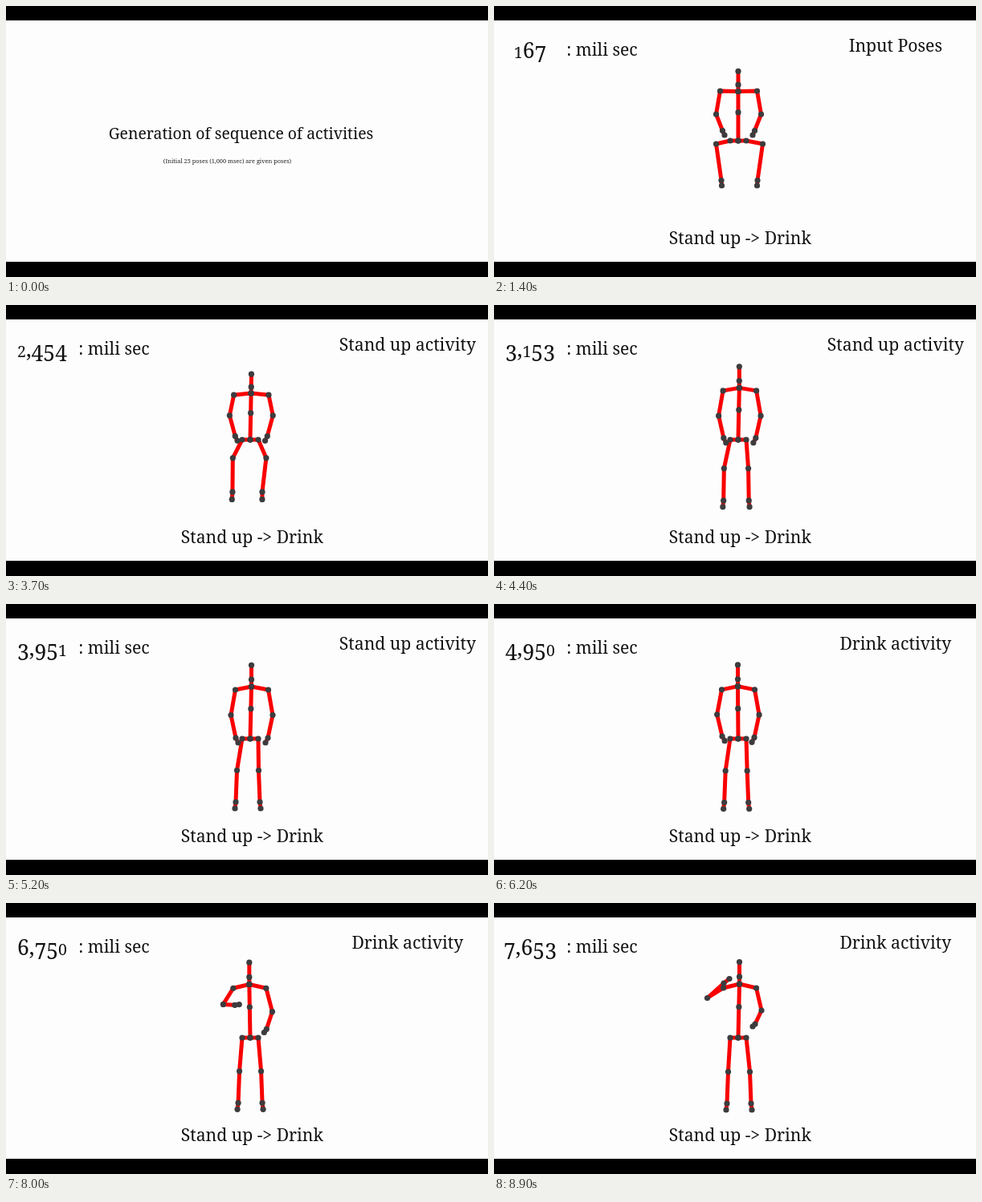
Animation of 600 by 338 pixels, one loop 9 s. Source, as an HTML page:

```html
<!DOCTYPE html>
<html lang="en">
<head>
<meta charset="utf-8">
<title>Generation of sequence of activities</title>
<style>
  html, body { margin: 0; width: 100%; height: 100%; overflow: hidden; background: #000; }
  svg { display: block; width: 100%; height: 100%; }
  text { font: 21.2px Georgia, "Noto Serif", serif; fill: #111; text-anchor: middle; }
  #title { font-size: 19.4px; }
  #note { font-size: 7.4px; fill: #222; }
  #counter { font-size: 26.5px; }
  .small { font-size: 19.5px; }
  #bones { fill: none; stroke: #f80000; stroke-width: 5; stroke-linejoin: round; }
  #joints { fill: #3c3c3e; }
</style>
</head>
<body>
<svg viewBox="0 0 600 338" xmlns="http://www.w3.org/2000/svg">
  <rect width="600" height="338" fill="#000"/>
  <rect y="18" width="600" height="301" fill="#fdfdfe"/>
  <g id="intro">
    <text id="title" x="292.5" y="166">Generation of sequence of activities</text>
    <text id="note" x="275.5" y="196">(Initial 25 poses (1,000 msec) are given poses)</text>
  </g>
  <g id="scene">
    <text id="counter" x="45" y="64.5"></text>
    <text x="134.5" y="62">: mili sec</text>
    <text id="activity" x="499.8" y="56.5"></text>
    <text x="306.3" y="296.5">Stand up -&gt; Drink</text>
    <path id="bones"/>
    <g id="joints"></g>
  </g>
</svg>
<script>
const SVG = "http://www.w3.org/2000/svg";
const LOOP = 9000, STEP = 100, SCENE_START = 1200;
const PELVIS = [304, 168], HIP_SPREAD = 10;
const ARM = ["shoulder", "elbow", "wrist", "hand"], LEG = ["knee", "ankle", "foot"];

// Each joint as [distance from the midline, y]; dip and sway apply while leaning forward.
const BODY = {
  shoulder: { seated: [23, 106], standing: [20.5, 107], dip: 17 },
  elbow: { seated: [28, 135], standing: [26, 138.5], dip: 3 },
  wrist: { seated: [20, 155.5], standing: [20, 167], dip: 6 },
  hand: { seated: [17.5, 161], standing: [17, 173], dip: 6 },
  knee: { seated: [29, 172], standing: [13.5, 207.5] },
  ankle: { seated: [22.5, 217.5], standing: [15, 247], sway: -8 },
  foot: { seated: [22, 224], standing: [16, 255], dip: 6, sway: -9 }
};
// Where the arms end up when drinking.
const DRINKING_LEFT = { elbow: [265.5, 118.5], wrist: [286, 100], hand: [293, 94.5] };
const DRINKING_RIGHT = { elbow: [333, 134], wrist: [325, 151], hand: [322, 154] };

const COUNT_KEYS = [[1400, 167], [2700, 1498], [3700, 2454], [5200, 3951], [7200, 5948], [8900, 7653]];
const ACTIVITIES = [[1200, "Input Poses"], [2200, "Stand up activity"], [5300, "Drink activity"]];

const $ = id => document.getElementById(id);
const mix = (a, b, k) => a + (b - a) * k;
const mixPoint = (p, q, k) => p.map((v, i) => mix(v, q[i], k));
const ramp = (t, from, to) => Math.min(1, Math.max(0, (t - from) / (to - from)));
const smooth = k => k * k * (3 - 2 * k);

function figure(t) {
  const rise = smooth(ramp(t, 2400, 4900));
  const lean = ramp(t, 1800, 2700) - ramp(t, 2700, 4200);
  const settle = ramp(t, 5700, 8700);
  const drink = settle ** 2;
  const shift = -4 * Math.sin(Math.PI * settle);

  const joint = (name, side, midline, drop) => {
    const { seated, standing, dip = 0, sway = 0 } = BODY[name];
    const [spread, y] = mixPoint(seated, standing, rise);
    return [midline + side * spread + sway * lean, y + dip * lean + drop];
  };
  const arm = (side, goal) => ARM.map(name => {
    const p = joint(name, side, mix(304.5, 306, rise) + shift, -settle);
    return goal[name] ? mixPoint(p, goal[name], drink) : p;
  });
  const leg = side => [
    [PELVIS[0] + side * HIP_SPREAD, PELVIS[1]],
    ...LEG.map(name => joint(name, side, mix(305.5, 301, rise) + 4 * settle, 3 * settle))
  ];

  const chest = [mix(304, 305.5, rise) + lean + shift, mix(106.5, 103, rise) + 16 * lean - 2 * settle];
  const head = [chest[0] + lean, chest[1] - .41 * (PELVIS[1] - chest[1])];
  const neck = mixPoint(chest, head, .33);
  const spine = mixPoint(PELVIS, chest, .575);
  return [
    [head, neck, chest, spine, PELVIS],
    [chest, ...arm(-1, DRINKING_LEFT)],
    [chest, ...arm(1, DRINKING_RIGHT)],
    [PELVIS, ...leg(-1)],
    [PELVIS, ...leg(1)]
  ];
}

function drawFigure(t) {
  const chains = figure(t), dots = $("joints");
  $("bones").setAttribute("d", chains.map(c => "M" + c.join("L")).join(""));
  chains.flat().forEach(([x, y], i) => {
    const dot = dots.children[i] || dots.appendChild(document.createElementNS(SVG, "circle"));
    dot.setAttribute("r", 3.6);
    dot.setAttribute("cx", x);
    dot.setAttribute("cy", y);
  });
}

function countAt(t) {
  let i = 1;
  while (i < COUNT_KEYS.length - 1 && t > COUNT_KEYS[i][0]) i++;
  const [t0, n0] = COUNT_KEYS[i - 1], [t1, n1] = COUNT_KEYS[i];
  return Math.max(0, Math.round(mix(n0, n1, (t - t0) / (t1 - t0))));
}

// Old-style figures: 0-2 are small, 6 and 8 rise, the rest hang below the line.
function drawCounter(value) {
  let level = 0;
  $("counter").replaceChildren(...Array.from(value.toLocaleString("en-US"), c => {
    const span = document.createElementNS(SVG, "tspan");
    const drop = "34579".includes(c) ? 5 : 0;
    span.textContent = c;
    span.setAttribute("dy", drop - level);
    if ("012".includes(c)) span.setAttribute("class", "small");
    level = drop;
    return span;
  }));
}

function render(t) {
  const started = t >= SCENE_START;
  $("intro").setAttribute("opacity", 1 - ramp(t, STEP, SCENE_START));
  $("scene").setAttribute("visibility", started ? "visible" : "hidden");
  if (!started) return;
  drawCounter(countAt(t));
  $("activity").textContent = ACTIVITIES.filter(([from]) => t >= from).pop()[1];
  drawFigure(t);
}

const start = performance.now();
function tick() {
  const t = (performance.now() - start) % LOOP;
  render(Math.floor(t / STEP) * STEP);
  requestAnimationFrame(tick);
}
tick();
</script>
</body>
</html>
```
